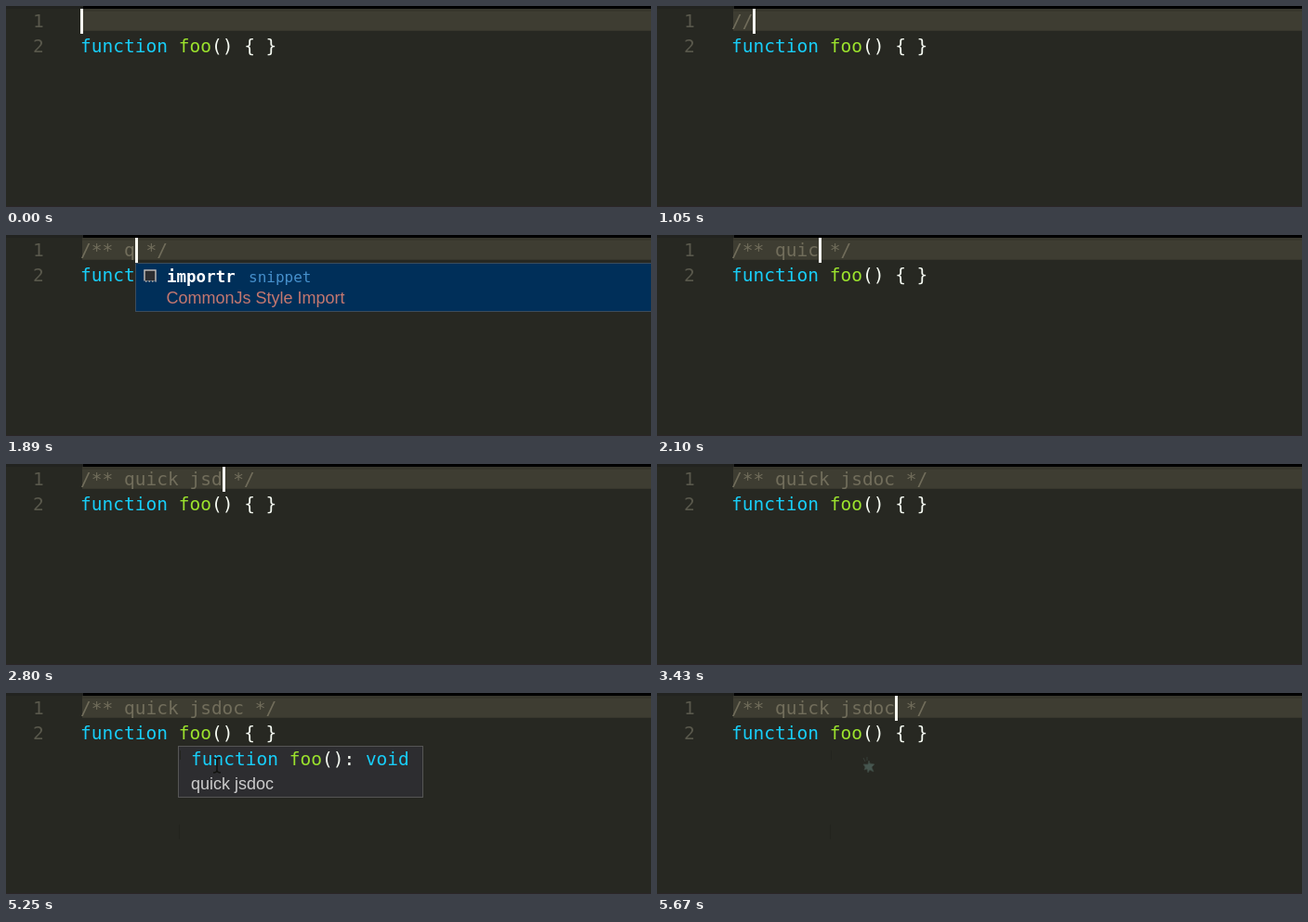
An HTML page that plays this animation: 694 px wide and 217 px high, repeating every 5950 ms.

```html
<!DOCTYPE html>
<html lang="en">
<head>
<meta charset="utf-8">
<title>Editor typing a doc comment</title>
<style>
  html, body { margin: 0; width: 100%; height: 100%; overflow: hidden; background: #272822; }
  svg { display: block; width: 694px; height: 217px; }
  text { font: 19.5px "DejaVu Sans Mono", monospace; white-space: pre; fill: #f6fbf3; }
  .comment { fill: #716d5b; }
  .number { fill: #59584c; }
  .keyword { fill: #18cdf8; }
  .name { fill: #9be22d; }
  .label { font-size: 17.5px; font-weight: bold; fill: #fff; }
  .kind { font-size: 16px; fill: #4690cc; }
  .detail { font: 18px "Liberation Sans", Arial, sans-serif; fill: #c4776f; }
</style>
</head>
<body>
<svg viewBox="0 0 694 217">
  <rect width="694" height="217" fill="#272822"/>
  <rect width="694" height="3" fill="#222320"/>
  <rect x="83" width="611" height="3" fill="#000"/>
  <rect x="82" y="3" width="612" height="24" fill="#38372d"/>
  <rect x="82" y="6" width="612" height="20" fill="#3e3d32"/>
  <rect y="216" width="694" height="1" fill="#2b2627"/>
  <text class="number" x="29" y="23">1</text>
  <text class="number" x="29" y="50">2</text>
  <rect id="wordHighlight" x="186" y="30" width="35" height="27" fill="#264f78" opacity=".4"/>
  <text id="comment" class="comment" x="80" y="23"></text>
  <text x="80" y="50"><tspan class="keyword">function</tspan> <tspan class="name">foo</tspan>() { }</text>

  <g id="popup">
    <rect x="139.5" y="30.5" width="560" height="52" fill="#002f59" stroke="#3c4c5c"/>
    <rect x="149" y="38" width="12" height="12" fill="#2d2d30" stroke="#c8c0bc" stroke-width="1.4"/>
    <path d="M148 50.5H162" stroke="#002f59" stroke-width="2" stroke-dasharray="2 1.5"/>
    <text class="label" x="173" y="51">importr</text>
    <text class="kind" x="261" y="51">snippet</text>
    <text class="detail" x="172.5" y="74">CommonJs Style Import</text>
  </g>

  <g id="hover">
    <rect x="185.5" y="57.5" width="263" height="55" fill="#2d2d30" stroke="#555"/>
    <text x="199" y="78"><tspan class="keyword">function</tspan> <tspan class="name">foo</tspan>(): <tspan class="keyword">void</tspan></text>
    <text class="detail" x="199" y="104" style="fill:#ccc">quick jsdoc</text>
  </g>

  <path id="trail" d="M186.500 142V158M187.500 62V72" stroke="#22231e"/>
  <path id="smudge" d="M222 70l2 4M226 69v4M222 77h5l1-4 1 3 5 1-3 3 2 5-4-2-2 3-1-4-3 1 1-3z" fill="#46564f" stroke="#3b463f" stroke-width=".8"/>
  <path id="pointer" d="M-4-8Q0-8 0-5Q0-8 4-8M0-6V6M-4 8Q0 8 0 5Q0 8 4 8" fill="none" stroke="#10110d" stroke-width="1.4"/>
  <rect id="caret" y="3" width="3" height="27" fill="#f8f8f0"/>
</svg>
<script>
  const LOOP = 5950, COLUMN = 11.74, LEFT = 80;
  const $ = id => document.getElementById(id);

  // [time, text before the caret, text after it]
  const edits = [
    [0, '', ''], [910, '/', ''], [1050, '//', ''], [1330, '/** ', ' */'],
    ...[1890, 1960, 2030, 2100, 2170, 2310, 2310, 2520, 2800, 2870, 3010].map((time, i) =>
      [time, '/** ' + 'quick jsdoc'.slice(0, i < 5 ? i + 1 : [6, 6, 8, 9, 10, 11][i - 5]), ' */'])
  ];
  const caretOff = [[210, 700], [1750, 1890], [3430, 3920], [4340, 4760], [5250, 5670]];
  // [time, x, y]
  const pointerPath = [
    [3710, 186, 150], [3780, 181, 125], [3850, 174, 100], [3920, 170, 82],
    [3990, 174, 66], [4060, 183, 53], [4130, 190, 47], [5250, 227, 78], [5320, 232, 182]
  ];

  const latest = (steps, t) => steps.filter(step => step[0] <= t).pop();
  const within = (t, start, end) => t >= start && t < end;
  const show = (id, visible) => $(id).setAttribute('visibility', visible ? 'visible' : 'hidden');

  function draw(t) {
    const [, before, after] = latest(edits, t);
    $('comment').textContent = before + after;
    $('caret').setAttribute('x', Math.round(LEFT + before.length * COLUMN));
    show('caret', !caretOff.some(([start, end]) => within(t, start, end)));

    show('popup', within(t, 1890, 1960));
    show('hover', within(t, 4480, 5320));
    show('wordHighlight', within(t, 4480, 5250));
    show('trail', t >= 4060);
    show('smudge', t >= 5320);

    show('pointer', within(t, 3710, 5390));
    const [, x, y] = latest(pointerPath, t) || pointerPath[0];
    $('pointer').setAttribute('transform', `translate(${x} ${y})`);
  }

  const start = performance.now();
  function frame() {
    draw((performance.now() - start) % LOOP);
    requestAnimationFrame(frame);
  }
  frame();
</script>
</body>
</html>
```
